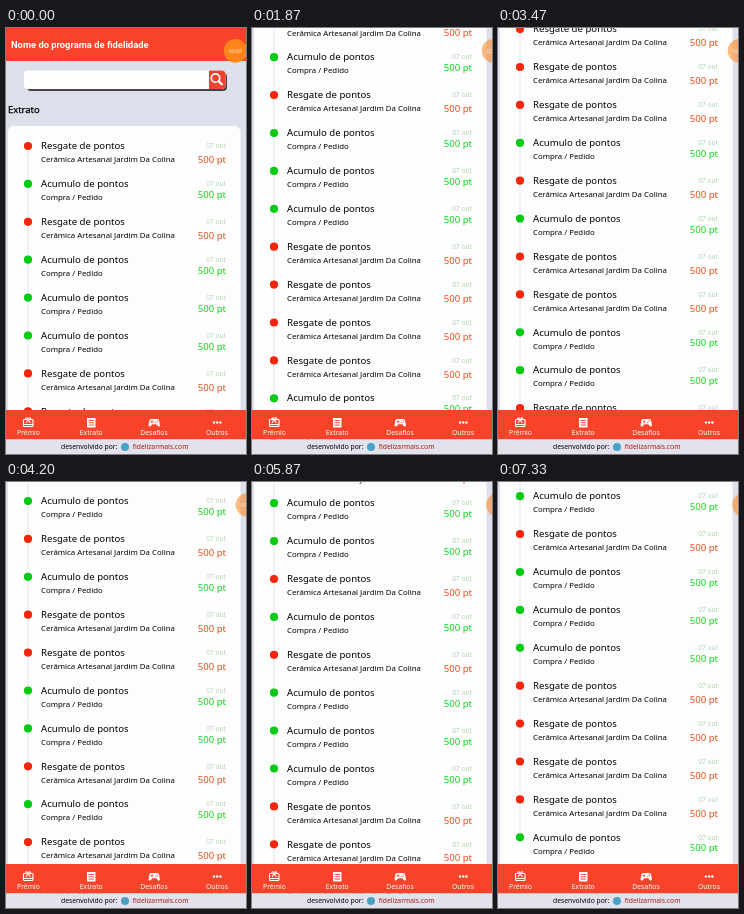
An HTML page that plays this animation: 240 by 426 pixels, repeating every 7.39 s.

```html
<!DOCTYPE html>
<html lang="pt-BR">
<head>
<meta charset="utf-8">
<style>
  html, body { margin: 0; width: 100%; height: 100%; overflow: hidden; background: #dddfea; }
  svg { display: block; width: 100vw; height: 100vh; }
  text { font-family: "Noto Sans", "Open Sans", sans-serif; }
  .title { font-size: 9.6px; }
  .sub { font-size: 7.82px; }
  .date { font-size: 6.6px; fill: #b2d6b2; text-anchor: end; }
  .points { font-size: 9.6px; text-anchor: end; }
  .nav text { font-size: 6.8px; text-anchor: middle; }
  .foot { font-size: 6.75px; }
</style>
</head>
<body>
<svg viewBox="0 0 240 426">
  <rect width="240" height="426" fill="#dddfea"/>
  <g id="page">
    <rect width="240" height="33" fill="#f6432a"/>
    <text x="5" y="19.6" fill="#fff" style="font: bold 9.37px Roboto, sans-serif">Nome do programa de fidelidade</text>

    <rect x="21" y="45" width="200" height="18" rx="4" fill="#4b4045"/>
    <rect x="18" y="42.5" width="201.5" height="18.5" rx="4" fill="#fff"/>
    <path d="M203 42.5h12.5a4 4 0 0 1 4 4v10.5a4 4 0 0 1-4 4H203z" fill="#f0432f"/>
    <g fill="none" stroke="#fff" stroke-width="1.7">
      <circle cx="209.5" cy="50" r="4.2"/>
      <path d="M212.5 53l4 4" stroke-width="2.2"/>
    </g>

    <text x="2" y="85.4" style="font-size: 9.4px; font-weight: 500" stroke="#000" stroke-width=".25">Extrato</text>
    <rect x="2" y="98" width="232.5" height="1090" rx="6" fill="#fdfdfe"/>
    <path d="M22 118V1141" stroke="#e4e5f2"/>
    <g id="rows"></g>
  </g>

  <g class="nav" fill="#fff">
    <rect y="382" width="240" height="29.5" fill="#f6432a"/>
    <g fill="none" stroke="#fff" stroke-width="1.1">
      <rect x="17.5" y="391.5" width="9.5" height="7" rx=".8"/>
      <path d="M17.5 396.5h9.5M20 395l2.25-3 2.25 3"/>
      <circle cx="20.7" cy="390.8" r="1"/>
      <circle cx="23.8" cy="390.8" r="1"/>
    </g>
    <rect x="81" y="390" width="8.5" height="9.5"/>
    <path d="M82.5 392.5h5.5M82.5 394.8h5.5M82.5 397.1h5.5" stroke="#f6432a" stroke-width=".9"/>
    <path d="M145 391h6.5q1.3 0 1.6 1.5l.8 4.5q0 2-1.6 1.5l-2.2-2.2h-3.7l-2.2 2.2q-1.6.5-1.6-1.5l.8-4.5q.3-1.5 1.6-1.5z"/>
    <path d="M144.5 393.7h3M146 392.2v3" stroke="#f6432a" stroke-width=".8"/>
    <g fill="#f6432a"><circle cx="149.8" cy="394.6" r=".7"/><circle cx="151.3" cy="393" r=".7"/></g>
    <circle cx="208" cy="394.5" r="1.2"/>
    <circle cx="211.2" cy="394.5" r="1.2"/>
    <circle cx="214.4" cy="394.5" r="1.2"/>
    <text x="22.5" y="406.6">Prêmio</text>
    <text x="85.3" y="406.6">Extrato</text>
    <text x="148" y="406.6">Desafios</text>
    <text x="211" y="406.6">Outros</text>
  </g>

  <rect y="411.5" width="240" height="14.5" fill="#e2e2ec"/>
  <text class="foot" x="55" y="421.3">desenvolvido por:</text>
  <circle cx="119" cy="419" r="4" fill="#4a9fc4"/>
  <text class="foot" x="126.7" y="421.3" fill="#a31f10">fidelizarmais.com</text>

  <g id="bubble">
    <circle cy="22.8" r="11.8" fill="#fd8519"/>
    <text y="24.6" fill="#fff0e4" text-anchor="middle" style="font-size: 5px">00:03</text>
  </g>
</svg>

<script>
const LOOP = 7390, FRAME = 1000 / 15, PITCH = 37.9;
const byId = id => document.getElementById(id);

// R = points redeemed, A = points earned
const kinds = 'RARAAARRRRARARRAARARAAARRRRA';
byId('rows').innerHTML = [...kinds].map((kind, i) => {
  const redeem = kind === 'R', y = 118 + i * PITCH;
  return `<g transform="translate(0 ${y})">
    <circle cx="22" r="4.1" fill="${redeem ? '#f4260a' : '#05cb12'}"/>
    <text class="title" x="35" y="3.2">${redeem ? 'Resgate' : 'Acumulo'} de pontos</text>
    <text class="sub" x="35" y="16.3">${redeem ? 'Cerâmica Artesanal Jardim Da Colina' : 'Compra / Pedido'}</text>
    <text class="date" x="220" y="2.2">07 out</text>
    <text class="points" x="220" y="${redeem ? 17.2 : 14.2}" fill="${redeem ? '#ea4c18' : '#0cd818'}">500 pt</text>
  </g>`;
}).join('');

// Scroll keys: [step, offset], joined by a monotone cubic
const keys = [[0, 0], [16, 31.5], [41, 272], [63, 478], [77, 554], [98, 752], [110, 786]];
const slopes = keys.slice(1).map(([s, y], i) => (y - keys[i][1]) / (s - keys[i][0]));
const tangents = keys.map((_, i) => {
  const a = slopes[i - 1], b = slopes[i];
  return a && b ? 2 * a * b / (a + b) : 0;
});

function scrollAt(step) {
  const i = Math.max(0, keys.findIndex(k => k[0] >= step) - 1);
  const [s0, y0] = keys[i], [s1, y1] = keys[i + 1];
  const h = s1 - s0, u = (step - s0) / h, v = 1 - u;
  return y0 * (1 + 2 * u) * v * v + y1 * u * u * (3 - 2 * u)
    + h * u * v * (v * tangents[i] - u * tangents[i + 1]);
}

function draw(now) {
  const t = now % LOOP;
  const step = Math.min(110, Math.floor((t + 4) / FRAME));
  byId('page').setAttribute('transform', `translate(0 ${-scrollAt(step)})`);
  const x = t < 1800 ? 229.5 : t < 5800 ? 241.5 : 246;
  byId('bubble').setAttribute('transform', `translate(${x} 0)`);
  byId('bubble').setAttribute('opacity', t < 1800 ? 1 : 0.55);
}

function loop() {
  draw(performance.now());
  requestAnimationFrame(loop);
}
loop();
</script>
</body>
</html>
```
